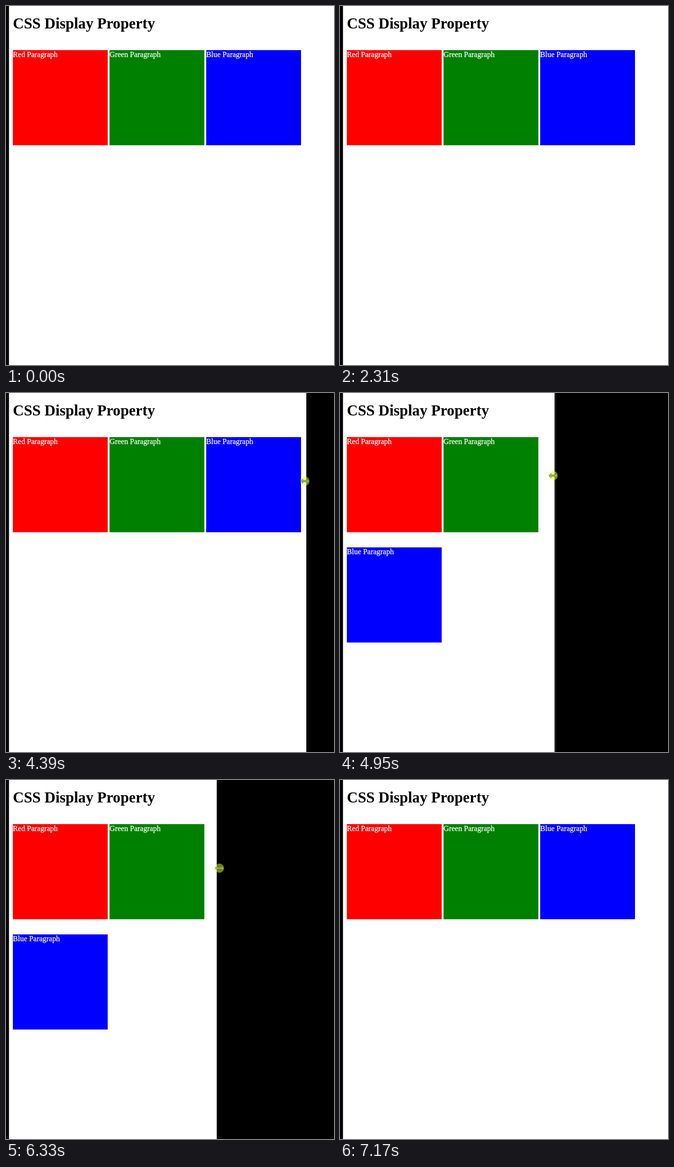
Write an HTML page that moves like this. It is 716x782 px and loops after 8000 ms.

```html
<!DOCTYPE html>
<html lang="en">
<head>
<meta charset="utf-8">
<title>CSS Display Property</title>
<style>
  html, body { margin: 0; width: 100%; height: 100%; overflow: hidden; background: #000; }
  svg { display: block; }
  text { font-family: "Liberation Serif", "Times New Roman", serif; font-size: 16.56px; fill: #fff; stroke: #fff; stroke-width: .3px; }
  text.title { font-size: 33.12px; font-weight: bold; fill: #000; stroke: none; }
</style>
</head>
<body>
<svg width="716" height="782" viewBox="0 0 716 782">
  <rect id="page" x="6.5" height="782" fill="#fff"/>
  <rect id="border" width="3" height="782" fill="#222"/>
  <text class="title" x="15" y="49">CSS Display Property</text>
  <g class="box"><rect width="207" height="207.2" fill="red"/><text y="15">Red Paragraph</text></g>
  <g class="box"><rect width="207" height="207.2" fill="green"/><text y="15">Green Paragraph</text></g>
  <g class="box"><rect width="207" height="207.2" fill="blue"/><text y="15">Blue Paragraph</text></g>
  <g id="scrollbar">
    <rect width="14" height="782" fill="#f1f1f1"/>
    <rect x="1" y="10" width="11" height="738" fill="#c1c1c1"/>
    <path d="M3.5 5.5h6l-3-3z" fill="#a3a3a3"/>
    <path d="M3.5 775.5h6l-3 3z" fill="#505050"/>
  </g>
  <g id="cursor">
    <circle r="10" fill="#ff0" fill-opacity=".5"/>
    <path id="arrows" d="M-9.5 0l5-4.5v3h9v-3l5 4.5l-5 4.5v-3h-9v3z" fill="#84c09a" stroke="#55783c"/>
  </g>
</svg>
<script>
const LOOP = 8000, TICKS = 115;
const MIN_EDGE = 420.5, GAP = 211, ROW = 240.2;
const PASS_START = 14, PASS_END = 32, TURN = 81;
const $ = id => document.getElementById(id);
const boxes = document.querySelectorAll(".box");

// The drag in and back out: tick, x, y.
const drag = [
  [57, 716, 197], [63, 652.5, 192], [68, 565, 184], [71, 465.5, 180],
  [77, 312, 181], [TURN, 312, 181], [85, 375.5, 186.5], [91, 466, 192], [103, 727, 197]
];
const dragStart = drag[0][0], dragEnd = drag[drag.length - 1][0];

function dragPoint(tick) {
  const i = Math.max(1, drag.findIndex(k => k[0] >= tick));
  const [t0, x0, y0] = drag[i - 1], [t1, x1, y1] = drag[i];
  const u = (tick - t0) / (t1 - t0);
  return [x0 + (x1 - x0) * u, y0 + (y1 - y0) * u];
}

// The pointer curves in from the right and slows down on its way up.
function passPoint(tick) {
  const u = (tick - PASS_START) / (PASS_END - PASS_START);
  const p = 1 - (1 - u) ** 1.8;
  return [648 + 64 * Math.abs(2 * p - 1) ** 3, 644 - 442 * p];
}

const move = (el, x, y) => el.setAttribute("transform", `translate(${x} ${y})`);
const show = (el, on) => el.setAttribute("visibility", on ? "visible" : "hidden");

function draw(now) {
  const tick = Math.floor((now % LOOP) / LOOP * TICKS + 0.15);
  const passing = tick >= PASS_START && tick <= PASS_END;
  const dragging = tick >= dragStart && tick < dragEnd;
  const inward = tick < TURN;
  const [x, y] = dragging ? dragPoint(tick) : passing ? passPoint(tick) : [0, 0];

  // The window edge trails the pointer and stops at its minimum width.
  const edge = dragging ? Math.max(MIN_EDGE, x + (inward ? 3 : -6)) : 716;
  const columns = edge >= 652 ? 3 : edge >= 441 ? 2 : 1;

  $("page").setAttribute("width", edge - 6.5);
  $("border").setAttribute("x", edge);
  show($("border"), inward && columns === 2);
  boxes.forEach((box, i) =>
    move(box, 15 + i % columns * GAP, 96.1 + Math.floor(i / columns) * ROW));
  move($("scrollbar"), edge - 13.5, 0);
  show($("scrollbar"), columns === 1);

  show($("cursor"), dragging || passing);
  show($("arrows"), dragging);
  move($("cursor"), x, y);
}

const start = performance.now();
function loop() {
  draw(performance.now() - start);
  requestAnimationFrame(loop);
}
loop();
</script>
</body>
</html>
```
